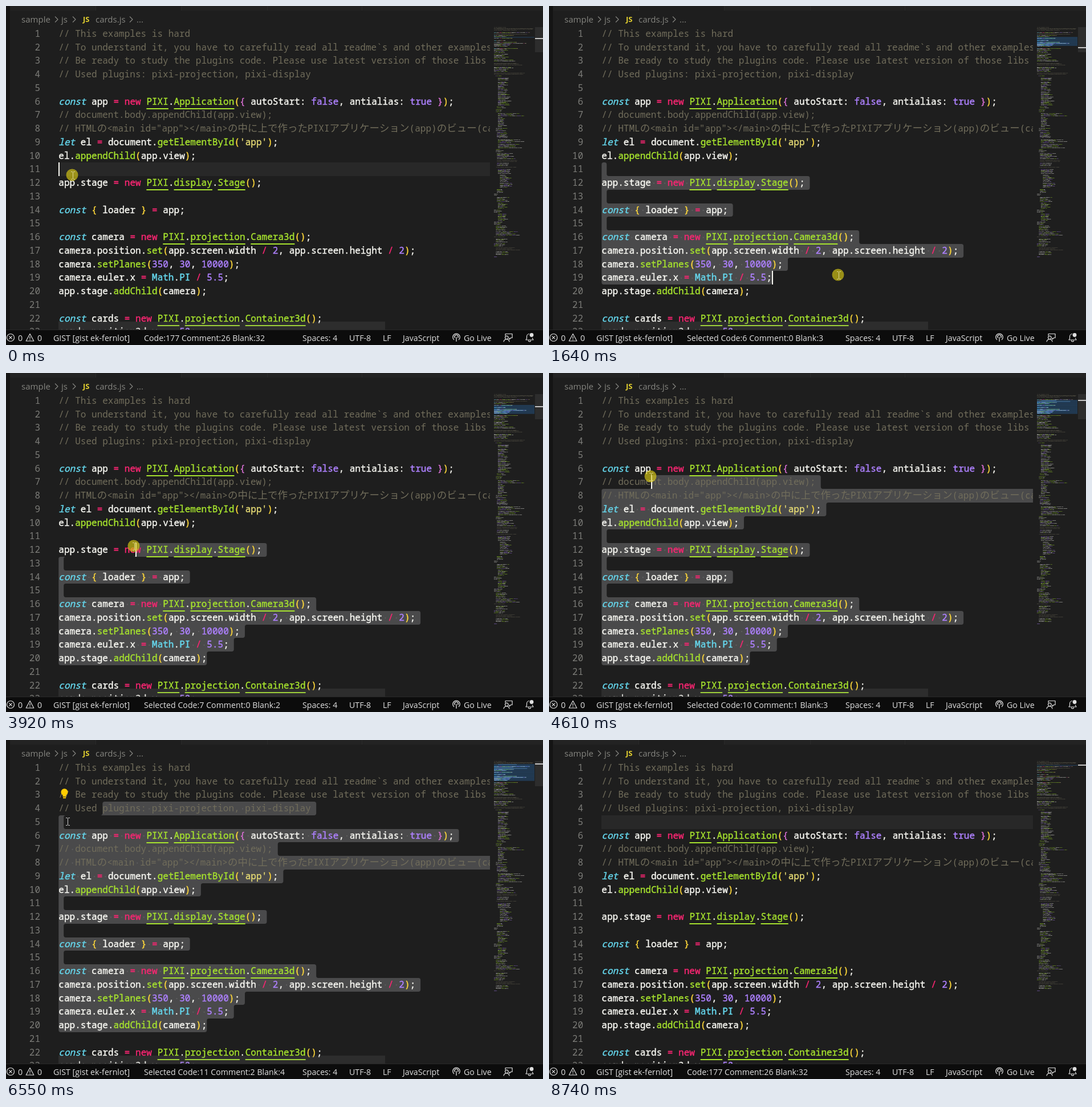
An HTML page with a canvas for the animation above (8.9 s loop, 942 by 594 pixels).

```html
<!DOCTYPE html>
<html lang="en">
<head>
<meta charset="utf-8">
<title>Line counter</title>
<style>
html, body { margin: 0; width: 100%; height: 100%; overflow: hidden; background: #1e1e1e; }
canvas { display: block; }
</style>
</head>
<body>
<canvas id="stage" width="942" height="594"></canvas>
<script>
const W = 942, H = 594, LOOP = 8900, STEP = 77;
const X0 = 92.3, CH = 9.63, WIDE = 17.5, Y0 = 36.8, ROW = 23.75;
const EDGE = 849, BOTTOM = 567, MAP_X = 856, MAP_W = 71, MAP_ROW = 1.74;
const MONO = '16.05px "Noto Sans Mono", "DejaVu Sans Mono", monospace';
const CJK = '17.5px "Noto Sans CJK JP", "Noto Sans CJK", sans-serif';
const UI = '"Open Sans", "Noto Sans", sans-serif';
const C = {
  bg: '#1e1e1e', text: '#f8f8f2', comment: '#716d5b', keyword: '#66d9ef', op: '#f92672',
  name: '#a6e22e', num: '#ae81ff', str: '#e6db74', gutter: '#7c7c78',
  select: '#4a4a4b', ui: '#e0e0e0'
};
const BRACKETS = ['#ffd83a', '#da70d6', '#4aa8ff'];

const LINES = `// This examples is hard
// To understand it, you have to carefully read all readme\`s and other examples
// Be ready to study the plugins code. Please use latest version of those libs
// Used plugins: pixi-projection, pixi-display

const app = new PIXI.Application({ autoStart: false, antialias: true });
// document.body.appendChild(app.view);
// HTMLの<main id="app"><\/main>の中に上で作ったPIXIアプリケーション(app)のビュー(canvas)
let el = document.getElementById('app');
el.appendChild(app.view);

app.stage = new PIXI.display.Stage();

const { loader } = app;

const camera = new PIXI.projection.Camera3d();
camera.position.set(app.screen.width / 2, app.screen.height / 2);
camera.setPlanes(350, 30, 10000);
camera.euler.x = Math.PI / 5.5;
app.stage.addChild(camera);

const cards = new PIXI.projection.Container3d();
cards.position3d.y = -50;`.split('\n');

// mouse path: time, x, y
const PATH = [
  [0, 116, 296], [480, 116, 296], [1330, 360, 402], [1410, 385, 412], [1640, 507, 471],
  [1870, 557, 510], [3360, 557, 510], [3920, 224, 303], [4230, 203, 246], [4610, 178, 181],
  [5140, 171, 121], [5710, 171, 121], [6060, 142, 235], [6400, 107, 142], [7420, 107, 142],
  [8280, 935, 600]
];
const PRESSES = [[0, 2190], [2740, 5710], [6720, 6790]];
const CARET_OFF = [[2190, 2720], [3210, 3360], [5540, 6070], [6550, 6720], [7270, 7800], [8280, LOOP]];
const BULBS = [[2020, 2980, 10], [5390, 6960, 3]];

// rest of the file as seen in the minimap: lines, indent, length (negative = comment)
const BLOCKS = [
  [3, 0, 30], [5, 0, 32], [2, 0, 50], [3, 0, -70], [5, 0, 48], [2, 0, -72], [1, 3, 24],
  [3, 8, 22], [9, 8, 22], [14, 8, 26], [2, 6, 20], [3, 4, 16], [3, 8, 55], [10, 8, 14],
  [3, 4, 20], [6, 6, 26], [4, 8, 58], [4, 8, 58], [3, 4, 12], [6, 6, 44], [2, 6, -70],
  [3, 6, 30], [1, 4, -76], [5, 8, 28], [7, 12, 20], [5, 12, 26], [4, 6, 12], [2, 0, 8],
  [5, 6, 26], [6, 8, 20], [3, 0, 16], [7, 8, 22], [3, 0, 16], [5, 4, 22], [4, 4, 50],
  [1, 0, -26], [4, 4, 26], [3, 0, 24], [3, 4, -50], [4, 4, 30], [1, 0, 3]
];

const g = document.getElementById('stage').getContext('2d');
g.lineJoin = 'round';
const within = (t, spans) => spans.find(s => t >= s[0] && t < s[1]);
const rowTop = row => Y0 + (row - 1) * ROW;
const isWide = c => c > '\u2fff';

function xOf(row, col) {
  let x = X0;
  for (const c of LINES[row - 1].slice(0, col)) x += isWide(c) ? WIDE : CH;
  return x;
}

function rect(c, x, y, w, h, color) {
  c.fillStyle = color;
  c.fillRect(x, y, w, h);
}

function label(s, x, y, font, color, { align = 'left', weight = 0 } = {}) {
  g.font = font;
  g.fillStyle = g.strokeStyle = color;
  g.textAlign = align;
  g.fillText(s, x, y);
  if (weight) {
    g.lineWidth = weight;
    g.strokeText(s, x, y);
  }
}

function strokes(d, color, width) {
  g.strokeStyle = color;
  g.lineWidth = width;
  g.stroke(new Path2D(d));
}

function tokenize(line) {
  const out = [];
  let depth = 0;
  const re = /\/\/.*|'[^']*'|[A-Za-z_]\w*|\d+(\.\d+)?|\s+|./g;
  for (const m of line.matchAll(re)) {
    const s = m[0], tok = { s, col: m.index, color: C.text };
    if (s.startsWith('//')) tok.color = C.comment;
    else if (s[0] === "'") tok.color = C.str;
    else if (/^(const|let)$/.test(s)) { tok.color = C.keyword; tok.italic = true; }
    else if (/^(Math|PI)$/.test(s)) tok.color = C.keyword;
    else if (/^(true|false|\d.*)$/.test(s)) tok.color = C.num;
    else if (/^(new|[=\/-])$/.test(s)) tok.color = C.op;
    else if (/^(PIXI|Application|display|projection|Stage|Camera3d|Container3d)$/.test(s)) {
      tok.color = C.name;
      tok.under = true;
    }
    else if (/[({]/.test(s)) tok.color = BRACKETS[depth++ % 3];
    else if (/[)}]/.test(s)) tok.color = BRACKETS[--depth % 3];
    else if (/\w/.test(s) && line[m.index + s.length] === '(') tok.color = C.name;
    out.push(tok);
  }
  return out;
}
const TOKENS = LINES.map(tokenize);

function makeMinimap() {
  const map = document.createElement('canvas');
  map.width = MAP_W;
  map.height = 530;
  const c = map.getContext('2d');
  let seed = 7, row = 0;
  const rnd = () => (seed = (seed * 16807) % 2147483647) / 2147483647;
  const put = (s, col, color) => {
    [...s].forEach((ch, i) => {
      if (ch === ' ') return;
      c.globalAlpha = 0.25 + 0.35 * rnd();
      rect(c, (col + i) * 0.87, Math.round(row * MAP_ROW), 0.87, 1, color);
    });
  };
  for (const line of TOKENS) {
    line.forEach(t => put(t.s, t.col, t.color));
    row++;
  }
  const palette = [C.text, C.text, C.text, C.text, C.name, C.name, C.num];
  for (const [count, indent, len] of BLOCKS) {
    for (let i = 0; i < count; i++, row++) {
      const end = indent + Math.abs(len) * (0.45 + 0.45 * rnd());
      for (let col = indent; col < end;) {
        const n = 2 + Math.floor(rnd() * 7);
        put('x'.repeat(n), col, len < 0 ? C.comment : palette[Math.floor(rnd() * palette.length)]);
        col += n + (rnd() < 0.7 ? 1 : 0);
      }
    }
    row++;
  }
  return map;
}
const minimap = makeMinimap();

function mouseAt(t) {
  let i = PATH.length - 1;
  while (PATH[i][0] > t) i--;
  const [t0, x0, y0] = PATH[i];
  const [t1, x1, y1] = PATH[i + 1] || [t0 + 1, x0, y0];
  const k = Math.min(1, Math.floor((t - t0) / STEP) * STEP / (t1 - t0));
  return { x: x0 + (x1 - x0) * k, y: y0 + (y1 - y0) * k };
}

function hit({ x, y }) {
  const row = Math.floor((y - Y0) / ROW) + 1;
  const line = LINES[row - 1];
  let col = 0;
  while (col < line.length && x > (xOf(row, col) + xOf(row, col + 1)) / 2) col++;
  return { row, col };
}

// list of selected row parts, top to bottom
function selection(anchor, caret) {
  const back = caret.row < anchor.row || (caret.row === anchor.row && caret.col < anchor.col);
  const [a, b] = back ? [caret, anchor] : [anchor, caret];
  const parts = [];
  if (a.row === b.row && a.col === b.col) return parts;
  for (let row = a.row; row <= b.row; row++) {
    const from = row === a.row ? a.col : 0;
    const to = row === b.row ? b.col : LINES[row - 1].length;
    const right = xOf(row, to) + (row === b.row ? 0 : 8.9);
    parts.push({ row, from, to, left: xOf(row, from), right, text: LINES[row - 1].slice(from, to) });
  }
  return parts;
}

function roundPoly(pts, r) {
  const n = pts.length;
  const dist = (p, q) => Math.hypot(p[0] - q[0], p[1] - q[1]);
  g.beginPath();
  g.moveTo((pts[0][0] + pts[n - 1][0]) / 2, (pts[0][1] + pts[n - 1][1]) / 2);
  pts.forEach((p, i) => {
    const next = pts[(i + 1) % n], prev = pts[(i + n - 1) % n];
    g.arcTo(...p, ...next, Math.min(r, dist(p, next) / 2, dist(p, prev) / 2));
  });
  g.closePath();
  g.fill();
}

function drawSelection(parts) {
  const shown = parts.filter(p => p.right > p.left);
  if (!shown.length) return;
  const first = shown[0], last = shown[shown.length - 1];
  const top = p => Math.round(rowTop(p.row)), end = p => Math.round(rowTop(p.row + 1));
  const pts = shown.flatMap(p => [[p.right, top(p)], [p.right, end(p)]]);
  pts.push([last.left, end(last)]);
  if (shown.length > 1) pts.push([X0, end(first)], [first.left, end(first)]);
  pts.push([first.left, top(first)]);
  g.fillStyle = C.select;
  roundPoly(pts, 3.7);
  for (const p of shown) {
    for (let col = p.from; col < p.to; col++) {
      if (LINES[p.row - 1][col] !== ' ') continue;
      rect(g, xOf(p.row, col) + 4, rowTop(p.row) + 11.5, 2, 2, 'rgba(227,228,226,0.13)');
    }
  }
}

function drawCode() {
  TOKENS.forEach((line, i) => {
    const row = i + 1, base = Math.round(rowTop(row) + 17);
    for (const t of line) {
      let x = xOf(row, t.col);
      const start = x, weight = t.color === C.comment ? 0 : 0.4;
      for (const run of t.s.match(/[\u3000-\uffff]+|[^\u3000-\uffff]+/g)) {
        const wide = isWide(run[0]);
        label(run, x, base, (t.italic ? 'italic ' : '') + (wide ? CJK : MONO), t.color, { weight });
        x += run.length * (wide ? WIDE : CH);
      }
      if (t.under) rect(g, start, base + 6, x - start, 2, C.name);
    }
  });
}

function drawBulb(row) {
  const y = rowTop(row) + 7;
  g.fillStyle = '#ffcc00';
  g.beginPath();
  g.arc(102.5, y, 6, 0, 7);
  g.fill();
  g.fillRect(99.5, y + 4, 6, 4);
  g.fillRect(100, y + 9, 5, 2);
}

function drawMouse({ x, y }, pressed) {
  if (x > EDGE || y > BOTTOM) return;
  if (pressed) {
    g.fillStyle = 'rgba(220,205,20,0.65)';
    g.beginPath();
    g.arc(x, y, 10.5, 0, 7);
    g.fill();
  }
  const cx = Math.round(x + 1), cy = Math.round(y + 1);
  strokes(`M${cx - 3} ${cy - 6.5}h2.5l1 1l1 -1h2.5M${cx + 0.5} ${cy - 6}v12M${cx - 3} ${cy + 6.5}h2.5l1 -1l1 1h2.5`,
    pressed ? '#dcd690' : '#d0d0d0', 1);
}

function drawMinimap(parts, caret, slider) {
  const y = row => Y0 + (row - 1) * MAP_ROW;
  for (const p of parts) {
    rect(g, MAP_X, y(p.row), MAP_W, MAP_ROW, 'rgba(38,79,120,0.6)');
    rect(g, MAP_X + p.from * 0.87, y(p.row), Math.min(MAP_W, (p.to - p.from) * 0.87), MAP_ROW, '#2a5b8e');
  }
  if (!parts.length) rect(g, MAP_X, y(caret.row), MAP_W, 1.2, 'rgba(38,79,120,0.6)');
  g.drawImage(minimap, MAP_X, 37);
  rect(g, 928, 37, 14, 44, `rgba(121,121,121,${0.17 * slider})`);
  rect(g, 928, Math.round(32.7 + 2.08 * caret.row), 14, 2, '#c4c4c4');
}

function drawHeader() {
  rect(g, 0, 0, W, 8, '#232323');
  rect(g, 158, 0, 149, 8, C.bg);
  for (const x of [157, 307, 458, 624]) rect(g, x, 0, 1, 8, '#2a2a2a');
  rect(g, 0, 0, 7, H, '#141414');
  const font = '15px ' + UI, color = '#84847f';
  label('sample', 27, 28.5, font, color);
  label('js', 97, 28.5, font, color);
  label('JS', 135, 27.5, 'bold 13px ' + UI, '#e3d02f');
  label('cards.js', 157, 28.5, font, color);
  label('...', 229, 28.5, font, color);
  for (const x of [86, 117, 217]) strokes(`M${x} 18.5l5 5l-5 5`, color, 1.2);
}

function count(parts) {
  if (!parts.length) return 'Code:177 Comment:26 Blank:32';
  const n = { code: 0, comment: 0, blank: 0 };
  for (const { text } of parts) {
    n[!text.trim() ? 'blank' : text.startsWith('//') ? 'comment' : 'code']++;
  }
  return `Selected Code:${n.code} Comment:${n.comment} Blank:${n.blank}`;
}

function drawStatus(parts) {
  rect(g, 0, BOTTOM, W, H - BOTTOM, '#0c0c0c');
  rect(g, 0, BOTTOM, W, 1, '#292929');
  const items = [
    ['0', 21], ['0', 55], ['GIST [gist ek-fernlot]', 83], [count(parts), 242], ['Spaces: 4', 520],
    ['UTF-8', 602], ['LF', 661], ['JavaScript', 696], ['Go Live', 803]
  ];
  for (const [s, x] of items) label(s, x, 586.5, '14.2px ' + UI, C.ui);
  strokes('M1.5 581a6.5 6.5 0 1 0 13 0a6.5 6.5 0 1 0 -13 0M5.3 578.3l5.4 5.4M10.7 578.3l-5.4 5.4', C.ui, 1.2);
  strokes('M42 574.5l-6.8 12.5h13.6zM42 579v4M42 584v1.5', C.ui, 1.2);
  strokes('M786 585a6.2 6.2 0 1 1 8 0M787.5 581.5a3.2 3.2 0 1 1 5 0M790 580v8', C.ui, 1.3);
  strokes('M876 578v-3.5h12v7h-2.5l-2.5 2.5v-2.5M875.5 581a2.8 2.8 0 1 0 5.6 0a2.8 2.8 0 1 0 -5.6 0M873 588.5a5 4.5 0 0 1 10 0', C.ui, 1.2);
  strokes('M918 574.5a4.6 4.6 0 0 0 -4.5 4.5v3.5l-1.5 2.5h13l-1.5 -2.5v-1M916.5 586a2 2 0 0 0 4 0', C.ui, 1.2);
  g.fillStyle = C.ui;
  g.beginPath();
  g.arc(922, 576.5, 3.4, 0, 7);
  g.fill();
}

function draw(t) {
  const mouse = mouseAt(t), pressed = within(t, PRESSES);
  const [down, up] = PRESSES.filter(p => p[0] <= t).pop();
  const anchor = hit(mouseAt(down)), caret = hit(mouseAt(Math.min(t, up - 1)));
  const parts = selection(anchor, caret);
  const slider = Math.max(0, Math.min(1, (8250 - t) / 250));

  rect(g, 0, 0, W, H, C.bg);
  drawHeader();
  g.save();
  g.beginPath();
  g.rect(7, 36, EDGE - 7, BOTTOM - 36);
  g.clip();
  LINES.forEach((_, i) => label(i + 1, 60, Math.round(rowTop(i + 1) + 17), MONO, C.gutter, { align: 'right' }));
  if (parts.length) drawSelection(parts);
  else rect(g, 92, Math.round(rowTop(caret.row)), EDGE - 92, 24, '#282828');
  drawCode();
  if (!within(t, CARET_OFF)) {
    rect(g, Math.round(xOf(caret.row, caret.col)), Math.round(rowTop(caret.row)), 2, 24, C.text);
  }
  const bulb = within(t, BULBS);
  if (bulb) drawBulb(bulb[2]);
  rect(g, 92, 553, 573, 14, `rgba(121,121,121,${0.17 * slider})`);
  g.restore();
  drawMinimap(parts, caret, slider);
  drawStatus(parts);
  drawMouse(mouse, pressed);
}

const begin = performance.now();
(function tick() {
  draw((performance.now() - begin) % LOOP);
  requestAnimationFrame(tick);
})();
</script>
</body>
</html>
```
